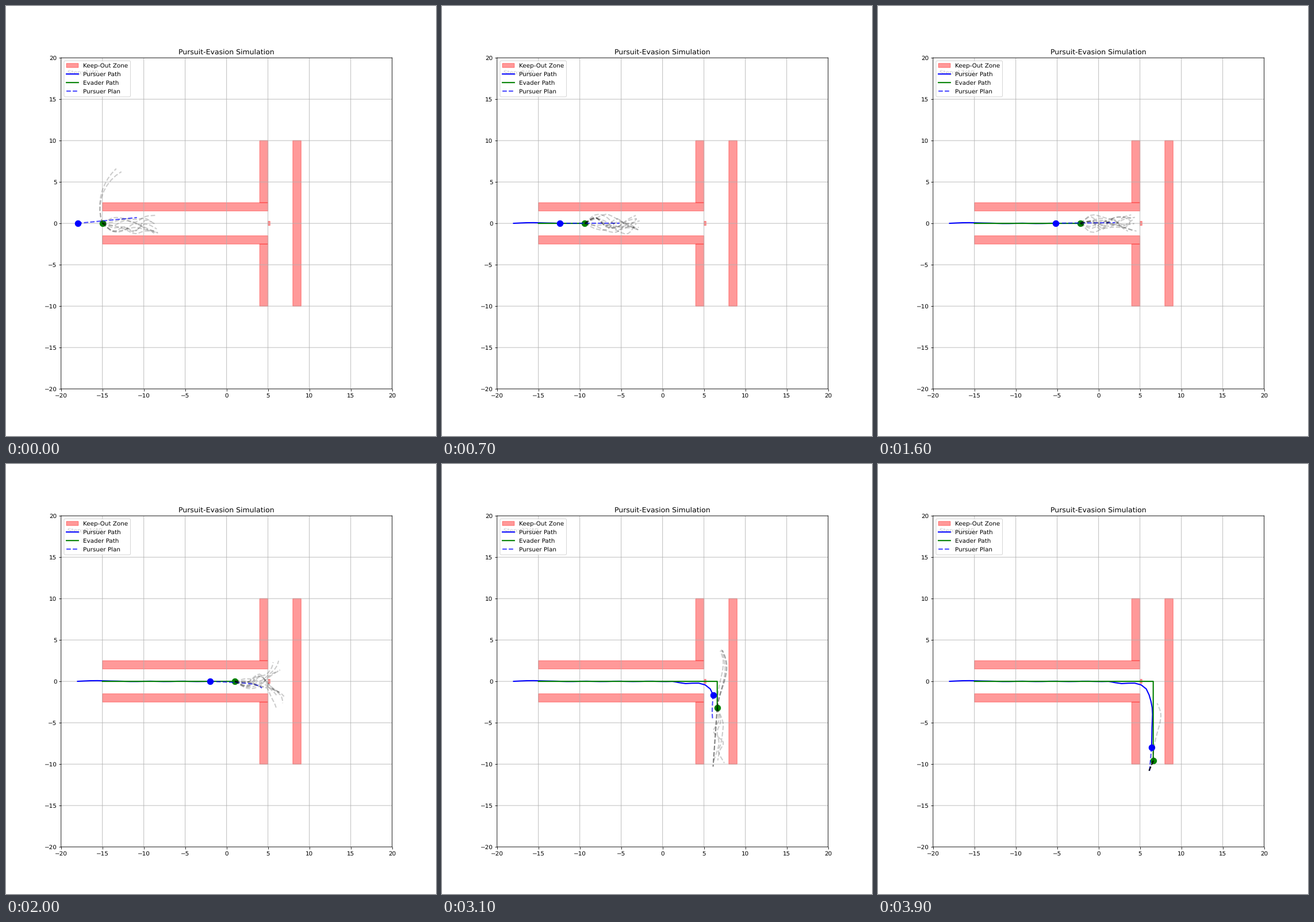
Recreate the animation shown at these times as a matplotlib script. Size 748 by 748 pixels, loop 4 s.

```python
import numpy as np
import matplotlib.pyplot as plt
from matplotlib.animation import FuncAnimation
from matplotlib.patches import Rectangle

STEPS = 40
SPEED = 0.8
REACH = 9 * SPEED
FLOOR = -10.8
STRAIGHT = 24  # pursuer steps before its bend
TURN = 27      # step at which the evader turns down

ZONES = [(-15, 1.5, 20, 1), (-15, -2.5, 20, 1), (4, 2.5, 1, 7.5),
         (4, -10, 1, 7.5), (8, -10, 1, 20), (5, -0.25, 0.25, 0.5)]
BEND = [(1.2, 0), (2.8, -.27), (4.4, -.22), (5.75, -.9), (6.47, -3.15),
        (6.45, -5.6), (6.4, -8.1)]
AIM = [(3, -.3), (4.5, -1), (5.5, -2.1), (6, -4), (6.3, -7), (6.15, FLOOR)]


def smooth(pts, length=REACH, count=19):
    """Catmull-Rom curve through pts, evenly sampled up to an arc length."""
    p = np.array(pts, float)
    p = np.vstack([2 * p[0] - p[1], p, 2 * p[-1] - p[-2]])
    t = np.linspace(0, 1, 8)[:, None]
    q = np.vstack([b + 0.5 * t * (c - a + t * (2 * a - 5 * b + 4 * c - d
                                               + t * (3 * (b - c) + d - a)))
                   for a, b, c, d in zip(p, p[1:], p[2:], p[3:])])
    s = np.r_[0, np.cumsum(np.hypot(*np.diff(q, axis=0).T))]
    at = np.linspace(0, min(length, s[-1]), count)
    return np.c_[np.interp(at, s, q[:, 0]), np.interp(at, s, q[:, 1])]


# Paths actually travelled
n = np.arange(STEPS)
evader = np.c_[-15 + SPEED * np.minimum(n, TURN),
               -SPEED * np.maximum(n - TURN, 0)]

m = n[:STRAIGHT]
drift = .1 * np.exp(-((m - 3.2) / 1.9) ** 2) + .02 * np.sin(1.3 * m)
turns = STEPS - STRAIGHT
pursuer = np.vstack([np.c_[-18 + SPEED * m, drift],
                     smooth(BEND, SPEED * (turns - 1), turns)])


def weave(x, side, bend, rng):
    """Wander along the corridor, right (side 1) or left (side -1)."""
    y = bend
    pts = [(x, 0), (x + 1.3 * side, y)]
    for dx in (2.6, 3.9, 5.2, rng.uniform(6.2, 6.8)):
        y = np.clip(.5 * y + rng.uniform(-.95, .95), -1.25, 1.15)
        pts.append((x + side * dx, y))
    return smooth(pts)


def swerve(x, k, rng):
    """Steady turn, back towards the start as k grows."""
    sweep = np.radians(-65 + 65 * k + rng.uniform(-15, 15))
    heading = np.radians(105 + 15 * k) + sweep * np.linspace(0, 1, 9)
    steps = SPEED * np.c_[np.cos(heading), np.sin(heading)]
    return np.vstack([(x, 0), (x, 0) + np.cumsum(steps, axis=0)])


def corridor(x, k, rng):
    shared = rng.uniform(-1.2, 1.2)
    fans = [swerve(x, k, rng) for _ in range(2 - k // 2)] if k < 4 else []
    while len(fans) < 10:
        bend = shared if len(fans) < 4 else rng.uniform(-1.1, 1.1)
        fans.append(weave(x, 1, bend, rng))
    return fans


def junction(x, k, rng):
    fans = [weave(x, -1, -.6, rng)] if k > 20 else []
    while len(fans) < 10:
        side = 1 if len(fans) < 4 else -1
        lane = rng.uniform(5.5, 7.2)
        pts = [(x, 0)]
        pts += [(gx, rng.uniform(-.9, .9)) for gx in np.arange(x + 1.5, 5, 1.5)]
        pts.append(((pts[-1][0] + lane) / 2, side * .8))
        pts += [(np.clip(lane + rng.uniform(-.6, .6), 5.35, 7.7), side * dy)
                for dy in np.arange(1.8, 8.3, 1.6)]
        fans.append(smooth(pts, REACH * rng.uniform(.86, .98)))
    return fans


def climb(x, y, rng):
    t = np.linspace(0, 1, 7)
    bulge = rng.uniform(.6, 1.2) * np.sin(2.6 * t ** rng.uniform(.9, 2.4))
    return smooth(np.c_[x + bulge, y + rng.uniform(6.5, 7.1) * t])


def descend(x, y, wide, rng):
    drop = min(7.1, y - FLOOR)
    t = np.array([0, .25, .45, .65, .8, 1])
    side = -.5 * t
    if wide:
        side[1:] = rng.uniform(-.5, .9, 5) * min(1, drop / 5)
        drop *= rng.uniform(.88, .95)
    return smooth(np.c_[x + side, y - drop * t])


def predictions(k):
    rng = np.random.default_rng(70 + k)
    x, y = evader[k]
    if k < 17:
        return corridor(x, k, rng)
    if k < TURN:
        return junction(x, k, rng)
    ups = 4 if k < 34 else 1
    near_exit = y - FLOOR < 2
    return ([climb(x, y, rng) for _ in range(ups)]
            + [descend(x, y, i >= 3 and not near_exit, rng)
               for i in range(10 - ups)])


def pursuit_plan(k):
    x, y = pursuer[k]
    if k < 20:
        end = .7 * .3 ** k + .15 * np.sin(.43 * k)
        return smooth([(x, y), (x + REACH / 2, (y + end) / 2),
                       (x + REACH, end)])
    ahead = [p for p in AIM if p[0] - p[1] > x - y + 1]
    return smooth([(x, y)] + ahead, 6.4 if k < 28 else 3)


# Unsnapped lines and unhinted text give soft, evenly placed edges
plt.rcParams.update({"path.snap": False, "text.hinting": "none"})
fig, ax = plt.subplots(figsize=(10, 10), dpi=74.8)
fig.subplots_adjust(left=.1255, right=.9005, bottom=.1095, top=.8795)
ax.set_xlim(-20, 20)
ax.set_ylim(-20, 20)
ax.set_aspect("equal")
ax.grid(True)
ax.set_title("Pursuit-Evasion Simulation")
for i, (x, y, w, h) in enumerate(ZONES):
    ax.add_patch(Rectangle((x, y), w, h, color="red", alpha=0.4,
                           label="Keep-Out Zone" if i == 0 else None))

pursuer_line, = ax.plot([], [], "b-", lw=2, label="Pursuer Path")
evader_line, = ax.plot([], [], "g-", lw=2, label="Evader Path")
pursuer_dot = ax.scatter([], [], s=100, color="b", lw=1, zorder=2)
evader_dot = ax.scatter([], [], s=100, color="g", lw=1, zorder=2)
plan_line, = ax.plot([], [], "b--", lw=2, alpha=0.7, label="Pursuer Plan")
fan_lines = [ax.plot([], [], "k--", lw=2, alpha=0.2)[0] for _ in range(10)]
step_text = ax.text(0.02, 0.95, "", transform=ax.transAxes)
ax.legend(loc="upper left")


def draw(k):
    for line, dot, path in ((pursuer_line, pursuer_dot, pursuer),
                            (evader_line, evader_dot, evader)):
        line.set_data(*path[:k + 1].T)
        dot.set_offsets(path[k])
    plan_line.set_data(*pursuit_plan(k).T)
    for line, fan in zip(fan_lines, predictions(k)):
        line.set_data(*fan.T)
    step_text.set_text(f"Step: {k + 1}/{STEPS}")
    return [pursuer_line, evader_line, pursuer_dot, evader_dot, plan_line,
            step_text, *fan_lines]


anim = FuncAnimation(fig, draw, frames=STEPS, interval=100, repeat=True,
                     repeat_delay=0)
plt.show()
```
